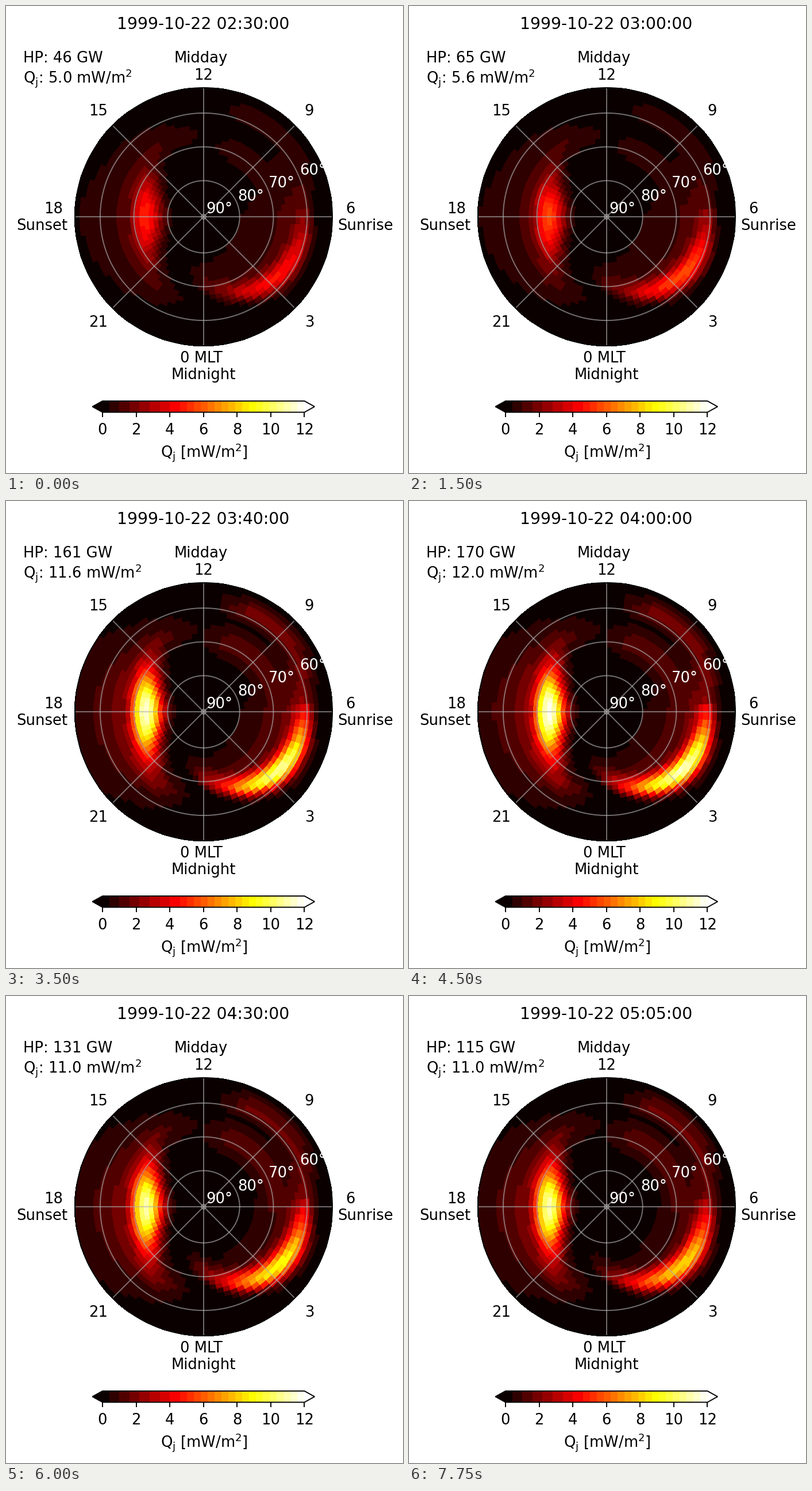
Animation, 691 px wide and 811 px high, one loop 8 s. Source, as a matplotlib script:

```python
import numpy as np
import matplotlib.pyplot as plt
from matplotlib.animation import FuncAnimation
from matplotlib.colors import BoundaryNorm, ListedColormap
from matplotlib.patches import Circle, Polygon

W, H, DPI = 691, 811, 128
PT = 72 / DPI
CX, CY, R = 344, 366, 224.5
FRAMES, INTERVAL = 32, 250

plt.rcParams["font.family"] = "DejaVu Sans"

# Key points in time: frame, hemispheric power in GW, peak heating in mW/m²
KEYS = [(0, 46, 5.0), (3, 50, 4.7), (6, 65, 5.6), (10, 152, 11.2), (18, 170, 12.0),
        (24, 131, 11.0), (28, 79, 9.3), (30, 95, 9.8), (31, 115, 11.0)]
KEY_FRAME, KEY_POWER, KEY_PEAK = zip(*KEYS)

# Dark steps are coarser than bright ones
levels = np.r_[0, np.linspace(0.4, 4, 7), np.linspace(4.6, 12, 19)]
hot = plt.get_cmap("hot")
mids = (levels[1:] + levels[:-1]) / 2
mids[0] = 0
cmap = ListedColormap(hot(mids / 12)).with_extremes(over="white")
norm = BoundaryNorm(levels, len(mids))

# Polar cells; m runs from midnight (bottom) through sunrise (right),
# d is the angle from sunset, positive towards midnight
r_edge = np.linspace(0, R, 29)
a_edge = np.arange(0, 360.1, 4.5)
RE, AE = np.meshgrid(r_edge, np.radians(a_edge))
r, mlt = np.meshgrid((r_edge[1:] + r_edge[:-1]) / 2, a_edge[:-1] + 2.25)
m = np.where(mlt < 300, mlt, mlt - 360)
d = np.where(mlt < 90, mlt + 90, mlt - 270)


def bump(x, center, inner, outer, power=2):
    width = np.where(x < center, inner, outer) * np.sqrt(2)
    return np.exp(-(np.abs(x - center) / width) ** power)


def fade(x, start, end):
    """Linear ramp from 0 at start to 1 at end."""
    return np.clip((x - start) / (end - start), 0, 1)


def dusk_core():
    along = bump(d, 0, 28, 30, power=2.3) * fade(d, 84, 74)
    center = np.minimum(101 + 0.0125 * d ** 2, 150)
    return along * bump(r, center, 20, 19)


dawn_center = 175 - 0.0083 * np.maximum(84 - m, 0) ** 2


def dawn_core():
    along = bump(m, 53, 29, 26) * fade(m, -24, -14) * np.where(m < 94.5, 1, 0.45)
    outer = 10 + 5 * bump(m, 52, 21, 21)
    return along * bump(r, dawn_center, 16, outer)


def evening_glow(scale):
    shape = np.where(d < 0, (d / 98) ** 2, (d / 84) ** 4)
    along = 1.8 * np.maximum(1 - shape, 0)
    scale = scale + (1 - scale) * fade(d, -30, -80)
    length = 75 - 0.7 * np.minimum(np.abs(d), 90)
    tail = np.exp(-np.maximum(r - 150, 0) / length)
    return scale * along * tail * bump(np.minimum(r, 150), 150, 20, 20)


def dawn_plateau(scale, cap):
    along = fade(m, -26, 0) * fade(m, 150, 95)
    inner = cap + 20 * fade(m, 40, -10) + 0.45 * np.clip(m - 90, 0, 90)
    ramp = np.maximum(0.4 + (0.5 + 0.9 * scale) * (r - inner) / 100, 0)
    return along * ramp * bump(np.maximum(r, dawn_center), dawn_center, 10, 10)


def morning_bands(scale):
    near = 1.25 * fade(m, 70, 90) * fade(m, 190, 158) * bump(r, 125, 18, 22)
    turn = fade(m, 90, 125)
    far = 1.5 * fade(m, 86, 94) * fade(m, 176, 156)
    return scale * np.maximum(near, far * bump(r, 176 + 14 * turn, 14, 11 + 5 * turn))


DUSK, DAWN = dusk_core(), dawn_core()


def activity(frame):
    return np.interp(frame, KEY_FRAME, KEY_POWER), np.interp(frame, KEY_FRAME, KEY_PEAK)


def heating(frame):
    power, peak = activity(frame)
    cap = 66 + 26 * fade(frame, 18, 26)
    glow = np.maximum.reduce([evening_glow(0.2 + 0.072 * peak),
                              dawn_plateau(0.1 * peak, cap),
                              morning_bands(0.1 * peak)])
    return np.hypot(peak * DUSK + (2.1 + 0.053 * power) * DAWN, glow)


fig = plt.figure(figsize=(W / DPI, H / DPI), dpi=DPI, facecolor="white")
ax = fig.add_axes([0, 0, 1, 1])
ax.set(xlim=(0, W), ylim=(H, 0))
ax.axis("off")


def label(x, y, text, ha="center", size=25.9, color="black"):
    return ax.text(x, y, text, ha=ha, va="baseline", fontsize=size * PT,
                   color=color, zorder=5)


def on_disc(radius, angle):
    return CX + radius * np.sin(angle), CY + radius * np.cos(angle)


mesh = ax.pcolormesh(*on_disc(RE, AE), heating(0), cmap=cmap, norm=norm, zorder=1)

# Grid, rim and latitude labels
grid = dict(color="#b0b0b0", alpha=0.65, lw=1.9 * PT, zorder=3)
for angle in np.radians(np.arange(0, 360, 45)):
    x, y = on_disc(R, angle)
    ax.plot([CX, x], [CY, y], solid_capstyle="butt", **grid)
circle = np.linspace(0, 2 * np.pi, 181)
for step in range(4):
    ring = 4 + 58.7 * step
    ax.plot(*on_disc(ring, circle), **grid)
    x, y = on_disc(ring, np.radians(112.5))
    label(x + 1, y - 4.4, f"{90 - 10 * step}°", ha="left", color="white")
ax.add_patch(Circle((CX, CY), R - 0.5, fill=False, ec="black", lw=1.9 * PT, zorder=4))

# Local time labels
for hour in (3, 9, 15, 21):
    x, y = on_disc(260, np.radians(15 * hour))
    label(x, y + 7.6, str(hour))
label(339.5, 98, "Midday")
label(343.5, 128, "12")
label(340, 619, "0 MLT")
label(343.8, 648, "Midnight")
label(83, 360, "18")
label(107.5, 389, "Sunset", ha="right")
label(591, 360, "6", ha="left")
label(577, 389, "Sunrise", ha="left")

# Colour scale
X0, X1, TOP, BOTTOM = 168, 519.5, 686, 705.5
MID = (TOP + BOTTOM) / 2
TIP = 17.6
ax.pcolormesh(X0 + levels / 12 * (X1 - X0), [TOP, BOTTOM], mids[None, :],
              cmap=cmap, norm=norm, zorder=1)
ax.add_patch(Polygon([(X0, TOP), (X0 - TIP, MID), (X0, BOTTOM)], fc=hot(0.0), ec="none"))
ax.add_patch(Polygon([(X0, TOP), (X1, TOP), (X1 + TIP, MID), (X1, BOTTOM),
                      (X0, BOTTOM), (X0 - TIP, MID)], fill=False, ec="black",
                     lw=1.9 * PT, joinstyle="miter", zorder=3))
for value in range(0, 13, 2):
    x = X0 + value / 12 * (X1 - X0)
    ax.plot([x, x], [BOTTOM, BOTTOM + 8.4], color="black", lw=1.9 * PT,
            solid_capstyle="butt", zorder=3)
    label(x, 744, str(value))
label(344.5, 784, r"Q$_\mathrm{j}$ [mW/m$^2$]")

title = label(343.5, 40, "", size=28.25)
power_text = label(30.5, 98, "", ha="left")
peak_text = label(30.5, 134, "", ha="left")


def update(frame):
    power, peak = activity(frame)
    minutes = 150 + 5 * frame
    title.set_text(f"1999-10-22 {minutes // 60:02d}:{minutes % 60:02d}:00")
    power_text.set_text(f"HP: {power:.0f} GW")
    peak_text.set_text(rf"Q$_\mathrm{{j}}$: {peak:.1f} mW/m$^2$")
    mesh.set_array(heating(frame))
    return mesh, title, power_text, peak_text


anim = FuncAnimation(fig, update, frames=FRAMES, interval=INTERVAL, repeat=True,
                     repeat_delay=0, blit=False)
plt.show()
```
